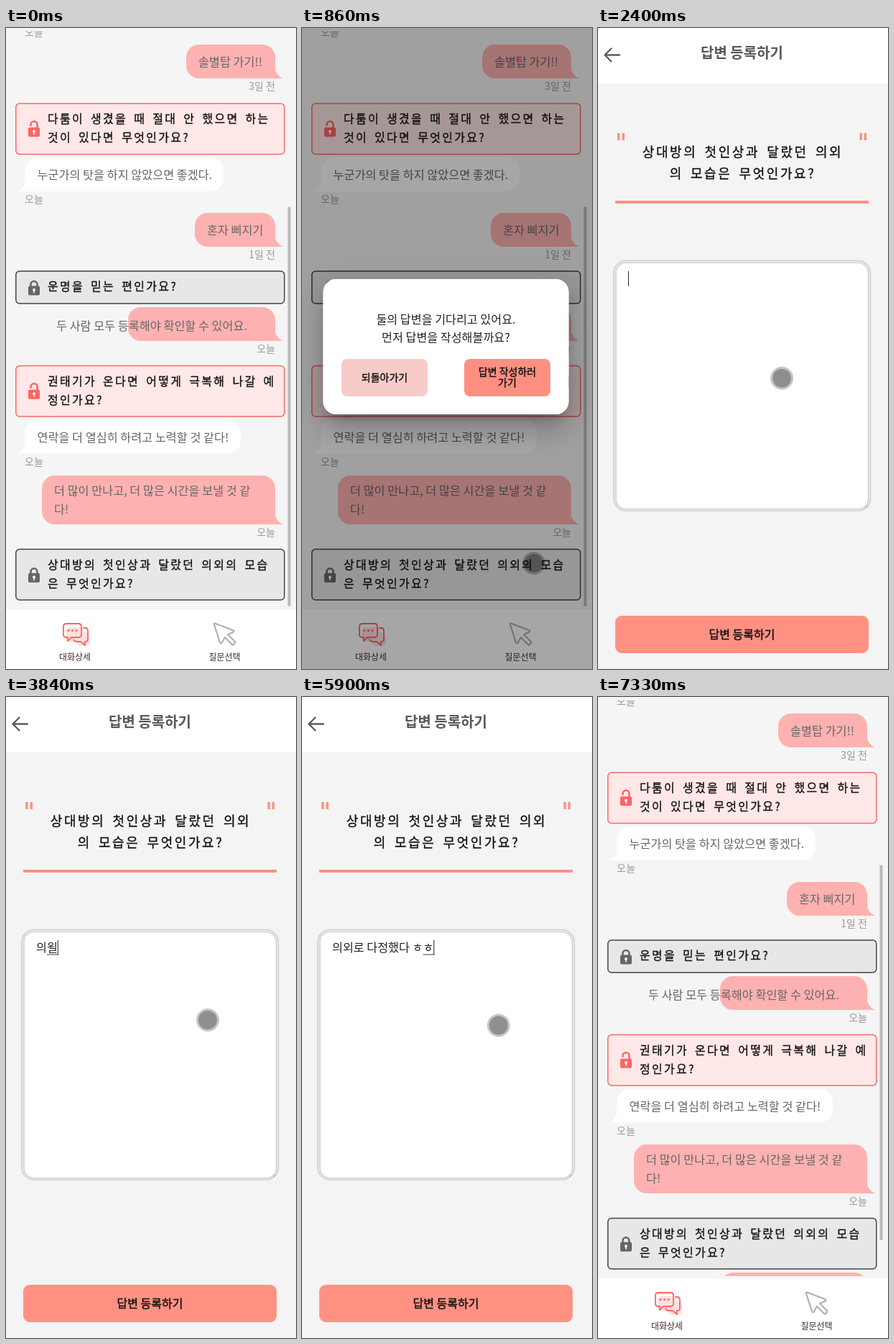
Write an HTML page with a canvas that moves like this. It is 404 px wide and 891 px high and loops after 7.69 s.

```html
<!DOCTYPE html>
<html lang="ko">
<head>
<meta charset="utf-8">
<style>
  html, body { margin: 0; width: 100%; height: 100%; overflow: hidden; background: #f5f5f5; }
  canvas { display: block; width: 404px; height: 891px; }
</style>
</head>
<body>
<canvas id="stage"></canvas>
<script>
const W = 404, H = 891, LOOP = 7690;
const canvas = document.getElementById('stage');
const ctx = canvas.getContext('2d');
const dpr = window.devicePixelRatio || 1;
canvas.width = W * dpr;
canvas.height = H * dpr;

const SANS = '"Noto Sans CJK KR", "Noto Sans CJK", sans-serif';
const CORAL = '#ff9182', RED = '#ff6464', PINK = '#fdb2b1', GREY = '#666';
const LIST_TOP = 4, LIST_BOTTOM = 805, SCROLL = 355;

const clamp = v => Math.max(0, Math.min(1, v));
const progress = (t, a, b) => clamp((t - a) / (b - a));
const easeOut = p => 1 - (1 - p) ** 3;
const lerp = (a, b, p) => a + (b - a) * p;

// ---------- drawing helpers ----------
function text(str, x, y, size, color, { align = 'left', weight = 400, thicken = 0 } = {}) {
  ctx.font = `${weight} ${size}px ${SANS}`;
  ctx.textAlign = align;
  ctx.fillStyle = ctx.strokeStyle = color;
  ctx.fillText(str, x, y + size * 0.37);
  if (thicken) {
    ctx.lineWidth = thicken;
    ctx.strokeText(str, x, y + size * 0.37);
  }
}

// Widely set type used for the questions.
function questionText(str, x, y, size, align = 'left') {
  ctx.save();
  ctx.letterSpacing = `${size * 0.143}px`;
  ctx.wordSpacing = `${size * 0.2}px`;
  text(str, x, y, size, '#111', { align, thicken: 0.3 });
  ctx.restore();
}

function box(x1, y1, x2, y2, radius, fill, stroke, width = 1.5) {
  ctx.beginPath();
  ctx.roundRect(x1, y1, x2 - x1, y2 - y1, radius);
  if (fill) { ctx.fillStyle = fill; ctx.fill(); }
  if (stroke) { ctx.strokeStyle = stroke; ctx.lineWidth = width; ctx.stroke(); }
}

function rect(x, y, w, h, color) {
  ctx.fillStyle = color;
  ctx.fillRect(x, y, w, h);
}

function disc(x, y, r, color) {
  ctx.beginPath();
  ctx.arc(x, y, r, 0, Math.PI * 2);
  ctx.fillStyle = color;
  ctx.fill();
}

function strokePath(d, color, width, fill) {
  const path = new Path2D(d);
  ctx.lineCap = ctx.lineJoin = 'round';
  if (fill) { ctx.fillStyle = fill; ctx.fill(path); }
  ctx.strokeStyle = color;
  ctx.lineWidth = width;
  ctx.stroke(path);
}

// ---------- conversation list ----------
function lock(y, open) {
  const color = open ? RED : GREY, top = open ? y - 6 : y - 4;
  ctx.beginPath();
  ctx.moveTo(34.5, open ? top + 2 : y);
  ctx.lineTo(34.5, top);
  ctx.arc(39, top, 4.5, Math.PI, 0);
  ctx.lineTo(43.5, y);
  ctx.lineCap = 'butt';
  ctx.strokeStyle = color;
  ctx.lineWidth = 2.6;
  ctx.stroke();
  box(31, y - 2, 47, y + 11, 2, color);
  disc(39, y + 3.5, 1.9, '#fff');
  rect(38.2, y + 4, 1.6, 4, '#fff');
}

function question({ y, open, lines }) {
  const bottom = y + (lines.length > 1 ? 70.5 : 45);
  box(13.8, y, 387.8, bottom, 5, open ? '#ffe8e7' : '#e7e7e7', open ? '#f76a6a' : '#444');
  lock((y + bottom) / 2, open);
  lines.forEach((line, i) => questionText(line, 58, y + 21.5 + i * 26, 16));
}

function bubble({ y, x1, x2, mine, lines, textX = x1 + 17, drop = 0, date }) {
  const tall = lines.length > 1;
  const bottom = y + (tall ? 68 : 47);
  const edge = mine ? x2 : x1, dir = mine ? 1 : -1;
  box(x1, y, x2, bottom, mine ? [18, 18, 0, 18] : [18, 18, 18, 0], mine ? PINK : '#fff');
  ctx.beginPath();
  ctx.moveTo(edge - dir, bottom - 16);
  ctx.quadraticCurveTo(edge + dir, bottom - 4, edge + dir * 11, bottom);
  ctx.lineTo(edge - dir, bottom);
  ctx.fill();
  lines.forEach((line, i) => text(line, textX, y + (tall ? 21 : 24) + drop + i * 26, 16.3, GREY));
  text(date, mine ? 375 : 26, bottom + 11, 14, '#999', { align: mine ? 'right' : 'left' });
}

const items = [
  { y: -52, x1: 26.5, x2: 327, lines: [], date: '오늘' },
  { y: 23, x1: 251, x2: 375, mine: true, lines: ['솔별탑 가기!!'], date: '3일 전' },
  { y: 105, open: true, lines: ['다툼이 생겼을 때 절대 안 했으면 하는', '것이 있다면 무엇인가요?'] },
  { y: 180, x1: 26.5, x2: 303, lines: ['누군가의 탓을 하지 않았으면 좋겠다.'], date: '오늘' },
  { y: 257, x1: 263, x2: 375, mine: true, lines: ['혼자 삐지기'], date: '1일 전' },
  { y: 338, open: false, lines: ['운명을 믿는 편인가요?'] },
  { y: 388, x1: 170, x2: 375, mine: true, lines: ['두 사람 모두 등록해야 확인할 수 있어요.'], textX: 70, drop: 1.5, date: '오늘' },
  { y: 469.5, open: true, lines: ['권태기가 온다면 어떻게 극복해 나갈 예', '정인가요?'] },
  { y: 544.5, x1: 26.5, x2: 327, lines: ['연락을 더 열심히 하려고 노력할 것 같다!'], date: '오늘' },
  { y: 622, x1: 50, x2: 375, mine: true, lines: ['더 많이 만나고, 더 많은 시간을 보낼 것 같', '다!'], date: '오늘' },
  { y: 724.5, open: false, lines: ['상대방의 첫인상과 달랐던 의외의 모습', '은 무엇인가요?'] }
];

function tabBar() {
  rect(0, 808.5, W, H - 808.5, '#fff');
  box(83, 833, 108, 853, 5, '#ffe1df');
  box(98, 840, 117, 859, 5, '#ffe1df');
  strokePath('M84 828H101Q105 828 105 832V843Q105 847 101 847H91L86 852V847H84Q80 847 80 843V832Q80 828 84 828Z', RED, 1.8);
  strokePath('M108 834H110Q114 834 114 838V850Q114 853 110 853V858L104 853H98Q95 853 94 850', RED, 1.8);
  for (const x of [87, 92.5, 98]) disc(x, 837.5, 1.5, RED);
  strokePath('M291 827.5L316 837Q319 838 316 840L309 843L319 853Q320 854 319 855L317 857Q316 858 315 857L305 847L301 854Q300 857 298 854L290 829Q289.5 827.5 291 827.5Z', '#b0b0b0', 2.2, '#fff');
  text('대화상세', 96, 875, 12, '#4a2a2a', { align: 'center' });
  text('질문선택', 304.5, 875, 12, '#333', { align: 'center' });
}

function listPage(answered) {
  rect(0, 0, W, H, '#f5f5f5');
  ctx.save();
  ctx.beginPath();
  ctx.rect(0, LIST_TOP, W, LIST_BOTTOM - LIST_TOP);
  ctx.clip();
  for (const item of items) ('open' in item ? question : bubble)(item);
  if (answered) box(171, 800, 375, 847, 18, PINK);
  ctx.restore();

  const ratio = 805 / (answered ? 1244 : 1168);
  rect(392.5, LIST_TOP + SCROLL * ratio, 4, 805 * ratio, '#b9b9b9');
  tabBar();
}

// ---------- dialog ----------
function shadow(offset, blur, spread, alpha) {
  ctx.save();
  ctx.shadowColor = `rgba(0,0,0,${alpha})`;
  ctx.shadowBlur = blur * dpr;
  ctx.shadowOffsetY = offset * dpr;
  box(29.5 - spread, 349 - spread, 371.5 + spread, 537 + spread, 18 + spread, '#fff');
  ctx.restore();
}

function dialogPanel() {
  // Shadows fall outside the panel only.
  ctx.save();
  ctx.beginPath();
  ctx.rect(-W, -H, 3 * W, 3 * H);
  ctx.roundRect(29.5, 349, 342, 188, 18);
  ctx.clip('evenodd');
  shadow(24, 38, 0, 0.16);
  shadow(9, 46, 0, 0.12);
  shadow(11, 15, -7, 0.2);
  ctx.restore();
  box(29.5, 349, 371.5, 537, 18, '#fff');

  const centered = { align: 'center' }, label = { align: 'center', thicken: 0.4 };
  text('둘의 답변을 기다리고 있어요.', 200.5, 405, 16.2, '#222', centered);
  text('먼저 답변을 작성해볼까요?', 200.5, 430, 16.2, '#222', centered);
  box(55, 460, 175, 512, 8, '#f7cbc7');
  box(226, 460, 346, 512, 8, '#ff8f81');
  text('되돌아가기', 115, 486, 14, '#111', label);
  text('답변 작성하러', 286, 478, 14, '#111', label);
  text('가기', 286, 492.5, 14, '#111', label);
}

function dialog(t) {
  rect(0, 0, W, H, `rgba(0,0,0,${0.4 * progress(t, 600, 900)})`);
  const shown = easeOut(progress(t, 600, 820)), scale = lerp(0.9, 1, shown);
  ctx.save();
  ctx.globalAlpha = shown;
  ctx.translate(200.5, 443);
  ctx.scale(scale, scale);
  ctx.translate(-200.5, -443);
  dialogPanel();
  ctx.restore();
}

// ---------- answer page ----------
// [time, finished text, syllable being composed]
const typing = [
  [0, '', ''],
  [2990, '', 'ㅇ'], [3080, '', '으'], [3170, '', '의'],
  [3330, '의', 'ㅇ'], [3450, '의', '오'], [3580, '의', '외'],
  [3840, '의', '욀'], [3910, '의외', '로'], [4000, '의외로 ', ''],
  [4090, '의외로 ', 'ㄷ'], [4180, '의외로 ', '다'],
  [4370, '의외로 ', '닺'], [4460, '의외로 다', '저'], [4560, '의외로 다', '정'],
  [4670, '의외로 다정', 'ㅎ'], [4770, '의외로 다정', '해'],
  [5040, '의외로 다정', '했'], [5130, '의외로 다정했', 'ㄷ'],
  [5210, '의외로 다정했', '다'], [5300, '의외로 다정했다 ', ''],
  [5500, '의외로 다정했다 ', 'ㅎ'], [5640, '의외로 다정했다 ㅎ', 'ㅎ']
];

function answerField(t) {
  box(22, 323.5, 379.5, 671, 17, '#ececec', '#cfcfcf', 1.6);
  box(25, 326.5, 376.5, 668.5, 14, '#fff', '#c9c9c9', 1.2);
  strokePath('M373 666.5L375 664.5', '#888', 1);

  const [, done, composing] = typing.findLast(step => step[0] <= t);
  text(done + composing, 42, 348.5, 16.2, '#222');
  const start = 42 + ctx.measureText(done).width;
  const end = 42 + ctx.measureText(done + composing).width;
  if (composing) rect(start, 357.5, end - start, 1, '#444');
  if (t >= 2310 && t < 6140) rect(end, 338, 1, 21, '#222');
}

function answerPage(t) {
  rect(0, 0, W, H, '#f4f4f4');
  rect(0, 0, W, 77, '#fff');
  strokePath('M30 37.5H9.5M18.5 28.5L9.5 37.5L18.5 46.5', '#5c5c5c', 2.3);
  text('답변 등록하기', 200.5, 34.5, 20, '#58585a', { align: 'center', weight: 700 });

  for (const x of [27, 33.5, 364.5, 370.5]) rect(x, 146, 3.5, 10, CORAL);
  const loaded = t >= 2150;
  if (loaded) {
    questionText('상대방의 첫인상과 달랐던 의외', 201.5, 172.5, 18, 'center');
    questionText('의 모습은 무엇인가요?', 201.5, 202, 18, 'center');
  }
  rect(24, loaded ? 240 : 180, 353, 4, CORAL);

  answerField(t);
  box(24, 817, 377, 869, 9, CORAL);
  text('답변 등록하기', 200.5, 843, 16, '#111', { align: 'center', thicken: 0.4 });
}

// ---------- pointer ----------
const route = [
  [130, 371, 834], [260, 323, 744], [870, 323, 744], [1250, 281, 537],
  [1460, 282, 497], [2270, 282, 497], [2400, 256, 487], [2580, 281, 449],
  [5840, 281, 449], [5900, 274, 455], [6170, 215, 847],
  [6800, 215, 847], [7330, 371, 834]
];
const presses = [[530, 600], [1780, 1850], [6580, 6650]];

function pointer(t) {
  const next = route.findIndex(point => point[0] > t);
  if (next < 1) return;
  const [t0, x0, y0] = route[next - 1], [t1, x1, y1] = route[next];
  const p = progress(t, t0, t1), x = lerp(x0, x1, p), y = lerp(y0, y1, p);
  const pressed = presses.some(([a, b]) => t >= a && t < b);
  disc(x, y, 16, pressed ? 'rgba(150,130,0,.55)' : 'rgba(0,0,0,.22)');
  disc(x, y, 13, pressed ? 'rgba(210,195,20,.8)' : 'rgba(0,0,0,.28)');
}

function draw(t) {
  ctx.setTransform(dpr, 0, 0, dpr, 0, 0);
  const answered = t >= 6800;
  if (t >= 1990 && !answered) answerPage(t);
  else listPage(answered);
  if (t >= 600 && t < 1850) dialog(t);
  pointer(t);
}

const begin = performance.now();
function tick() {
  draw((performance.now() - begin) % LOOP);
  requestAnimationFrame(tick);
}
tick();
</script>
</body>
</html>
```
